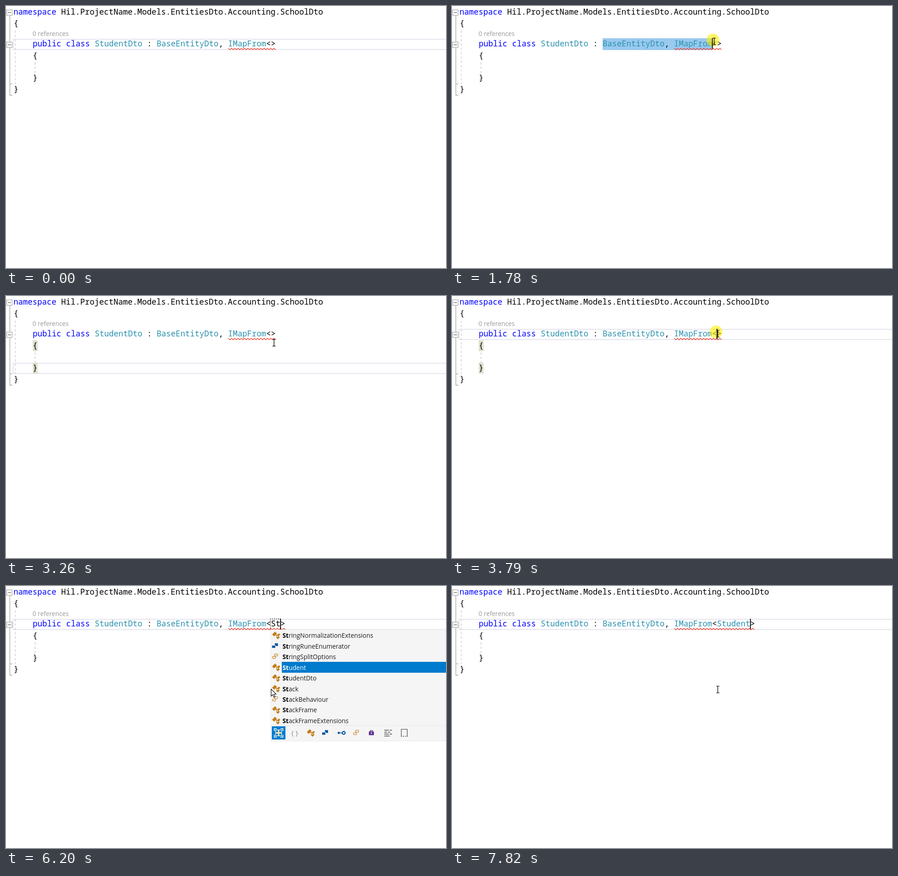
An HTML page with a canvas for the animation above (7.99 s loop, 970 px wide and 577 px high).

```html
<!DOCTYPE html>
<html lang="en">
<head>
<meta charset="utf-8">
<title>Code completion</title>
<style>
html, body { margin: 0; width: 100%; height: 100%; overflow: hidden; background: #fff; }
canvas { display: block; }
</style>
</head>
<body>
<canvas id="stage" width="970" height="577"></canvas>
<script>
const LOOP = 7990;
const CW = 10.5;              // width of one code character
const LEFT = 59;              // x of the class line
const TEAL = '#2b91af', BLUE = '#0000ff', GREY = '#a5a5a5';
const ORANGE = '#c27d1a', NAVY = '#00539c', PANEL = '#f5f5f5';
const MONO = '17.5px "Noto Sans Mono", monospace';
const UI = '13.85px "Open Sans", sans-serif';
const c = document.getElementById('stage').getContext('2d');

const WORD = 'Student';
const KEYS = [5670, 6120, 6430, 6810, 7060, 7290, 7440];   // key presses
const LISTS = [5820, 6200, 6510, 6890, 7120, 7360];        // list refreshes
const POPUP_END = 7590;

// cursor path: time, x, y
const PATH = [
  [150, 642, 459], [400, 420, 330], [620, 218, 190], [940, 326, 86],
  [1010, 326, 86], [1100, 327, 84], [1340, 327, 84], [1780, 578, 78],
  [1940, 597, 79], [2240, 597, 79], [2480, 602, 149], [2710, 602, 149],
  [3500, 586, 83], [3830, 586, 83], [4110, 586, 228]
];

// rows: icon kind and label
const ROWS_S = [
  ['class', 'SerializableAttribute'], ['struct', 'Single'], ['struct', 'Span'],
  ['class', 'StackOverflowException'], ['class', 'String'], ['class', 'StringComparer'],
  ['enum', 'StringComparison'], ['class', 'Student'], ['class', 'StudentDto']
];
const ROWS_ST = [
  ['class', 'StringNormalizationExtensions'], ['struct', 'StringRuneEnumerator'],
  ['enum', 'StringSplitOptions'], ['class', 'Student'], ['class', 'StudentDto'],
  ['class', 'Stack'], ['enum', 'StackBehaviour'], ['class', 'StackFrame'],
  ['class', 'StackFrameExtensions']
];
const ROWS_STU = [['class', 'Student'], ['class', 'StudentDto'], ['class', 'StudentMap']];

const col = n => LEFT + n * CW;
const within = (t, a, b) => t >= a && t < b;
const countPast = (times, t) => times.filter(k => t >= k).length;

function text(s, x, y, color, font = MONO) {
  c.font = font;
  c.fillStyle = color;
  c.fillText(s, x, y);
  return x + c.measureText(s).width;
}

function rect(x, y, w, h, color) {
  c.fillStyle = color;
  c.fillRect(x, y, w, h);
}

function line(points, color, width = 1, dash = []) {
  c.beginPath();
  points.forEach(([x, y]) => c.lineTo(x, y));
  c.setLineDash(dash);
  c.strokeStyle = color;
  c.lineWidth = width;
  c.stroke();
  c.setLineDash([]);
}

function dot(x, y, r, color) {
  c.beginPath();
  c.arc(x, y, r, 0, 7);
  c.fillStyle = color;
  c.fill();
}

function frame(x, y, w, h, color, width) {
  c.strokeStyle = color;
  c.lineWidth = width;
  c.strokeRect(x, y, w, h);
}

function cursorAt(t) {
  const i = PATH.findIndex(p => p[0] > t);
  if (i < 0) return PATH[PATH.length - 1].slice(1);
  const [t0, x0, y0] = PATH[i - 1], [t1, x1, y1] = PATH[i];
  const k = (t - t0) / (t1 - t0);
  return [x0 + (x1 - x0) * k, y0 + (y1 - y0) * k];
}

function fold(y) {
  rect(1, y - 6, 13, 13, '#fff');
  frame(1.5, y - 5.5, 12, 12, GREY, 1.2);
  line([[4, y + .5], [11, y + .5]], '#555', 1.2);
}

function outline() {
  line([[8.5, 21], [8.5, 196.5], [14, 196.5]], GREY, 1.3);
  line([[8, 171.5], [14, 171.5]], GREY, 1.3);
  fold(14);
  fold(85);
  line([[20.5, 54], [20.5, 172]], '#cacaca', 1.4, [5, 4.5]);
  line([[64, 124], [64, 148]], '#cacaca', 1.4, [5, 4.5]);
}

function lineBox(y) {
  frame(16, y, 970, 22.5, '#e8e8f2', 2.4);
}

function brace(x, y) {
  rect(x, y, CW, 24, '#dbe0cc');
}

function code(typed, resolved) {
  const x = text('namespace', 16.5, 19, BLUE);
  text(' Hil.ProjectName.Models.EntitiesDto.Accounting.SchoolDto', x, 19, '#000');
  text('{', 17, 43.5, '#000');
  text('0 references', 58.5, 66, '#999', UI);
  let at = LEFT;
  [['public class ', BLUE], ['StudentDto', TEAL], [' : ', '#000'], ['BaseEntityDto', TEAL],
   [', ', '#000'], ['IMapFrom', TEAL], ['<', '#000'],
   [typed, resolved ? TEAL : '#000'], ['>', '#000']
  ].forEach(([s, color]) => at = text(s, at, 89, color));
  text('{', LEFT, 114.5, '#000');
  text('}', LEFT, 164, '#000');
  text('}', 17, 188.5, '#000');

  const wave = [];
  for (let wx = 490, i = 0; wx <= at + 1; wx += 3.6, i++) wave.push([wx, i % 2 ? 96.5 : 93]);
  line(wave, '#ee4a3a', 1.4);
}

const ICONS = {
  class(x, y) {
    c.save();
    c.translate(x - 3.5, y - 3);
    c.rotate(-Math.PI / 4);
    rect(-4.5, -3, 9, 6, ORANGE);
    c.restore();
    line([[x - 2, y - 1], [x + 5, y - 1]], ORANGE, 1.4);
    line([[x + 1, y - 1], [x + 1, y + 5], [x + 4, y + 5]], ORANGE, 1.4);
    for (const [dx, dy] of [[5.5, -1], [4.5, 5]]) {
      c.save();
      c.translate(x + dx, y + dy);
      c.rotate(-Math.PI / 4);
      rect(-3, -2, 6, 4, ORANGE);
      c.restore();
    }
  },
  struct(x, y) {
    rect(x - 3, y - 6, 7, 6, NAVY);
    rect(x - 9, y - 2, 8, 7, PANEL);
    rect(x - 9, y - 1, 7, 5, NAVY);
  },
  enum(x, y) {
    for (const [dx, dy] of [[-3.5, -6], [-8, -.5]]) {
      c.beginPath();
      c.roundRect(x + dx, y + dy, 7, 4.5, 1.8);
      c.fillStyle = PANEL;
      c.fill();
      c.strokeStyle = ORANGE;
      c.lineWidth = 1.2;
      c.stroke();
    }
  }
};

function filterBar(y, bracesOn) {
  rect(586, y - 14.5, 30, 29, '#007acc');
  frame(594.5, y - 6.5, 13, 13, '#f3f3f3', 1.4);
  line([[594, y], [608, y]], '#f6e7b4', 3);
  line([[601, y - 7], [601, y + 7]], '#f6e7b4', 3);
  for (const sx of [-1, 1]) for (const sy of [-1, 1])
    line([[601 + sx * 4, y + sy * 9.5], [601 + sx * 9.5, y + sy * 9.5], [601 + sx * 9.5, y + sy * 4]], '#fff', 1.6);
  text('{ }', 628.5, y + 5, bracesOn ? '#424242' : '#b4b4b4', 'bold 15px "Open Sans", sans-serif');
  ICONS.class(672, y);
  ICONS.struct(706, y);
  line([[733, y], [742, y]], NAVY, 1.6);
  dot(733.5, y, 2.4, NAVY);
  dot(744.5, y, 4.2, NAVY);
  dot(744.5, y, 2, PANEL);
  ICONS.enum(774, y);
  frame(803, y - 5, 5, 4, '#5b2d90', 1.4);
  rect(800, y - 3, 11, 8, '#5b2d90');
  rect(804.5, y - 1, 2, 3, PANEL);
  [[834, 844], [846, 851], [834, 840], [842, 847], [834, 844], [846, 851], [834, 846]]
    .forEach(([a, b], i) => {
      const ly = y - 6 + Math.floor(i / 2) * 4.3;
      line([[a, ly], [b, ly]], '#424242', 1.5);
    });
  line([[871.5, y + 8], [871.5, y - 8], [884.5, y - 8], [884.5, y + 8]], '#424242', 1.2);
  line([[871, y + 7.5], [885, y + 7.5]], '#424242', 1.6, [2, 2]);
}

function popup(n) {
  const rows = n === 1 ? ROWS_S : n === 2 ? ROWS_ST : ROWS_STU.slice(0, n === 3 ? 3 : 2);
  const picked = n === 1 ? 4 : rows.findIndex(r => r[1] === WORD);
  const barTop = Math.min(307, 98 + 23.5 * rows.length);
  rect(583, 96, 387, barTop + 35 - 96, PANEL);
  line([[970, 96.5], [583.5, 96.5], [583.5, barTop + 34.5], [970, barTop + 34.5]], '#ececee');
  rows.forEach(([kind, label], i) => {
    const y = 109.3 + 23.45 * i;
    const on = i === picked;
    if (on) rect(608, Math.round(y - 12.4), 362, 24, '#007acc');
    ICONS[kind](595.5, y - .5);
    const x = text(label.slice(0, n), 609.5, y + 5, on ? '#fff' : '#000', 'bold ' + UI);
    text(label.slice(n), x, y + 5, on ? '#fff' : '#1e1e1e', UI);
  });
  line([[584, barTop], [970, barTop]], '#e6e6e8');
  filterBar(barTop + 16.5, n === 1);
  return barTop + 35;
}

function iBeam(x, y) {
  line([[x, y - 6.5], [x, y + 6.5]], '#000', 1.3);
  for (const s of [-1, 1]) {
    line([[x - 3.5, y + s * 7.5], [x - .8, y + s * 7.5], [x, y + s * 6.5],
          [x + .8, y + s * 7.5], [x + 3.5, y + s * 7.5]], '#000', 1.2);
  }
}

function arrow(x, y) {
  c.save();
  c.translate(x + .5, y);
  const shape = new Path2D('M0 0V15.5L3.6 12.2 6.2 18 8.8 16.8 6.2 11.2H11Z');
  c.fillStyle = '#fff';
  c.fill(shape);
  c.strokeStyle = '#000';
  c.lineWidth = 1.1;
  c.stroke(shape);
  c.restore();
}

function draw(t) {
  rect(0, 0, 970, 577, '#fff');
  const n = countPast(KEYS, t);
  const [mx, my] = t < PATH[0][0] ? [-50, -50] : cursorAt(t);

  let caret = null, selEnd = 26;
  if (within(t, 1340, 2480)) {
    selEnd = Math.max(26, Math.min(51, Math.round((mx - 4 - LEFT) / CW)));
    caret = [col(selEnd) + .5, 71];
  } else if (within(t, 2480, 3790)) {
    if (Math.floor((t - 2480) / 540) % 2 === 0) caret = [70, 147];
  } else if (t >= 3790) {
    const since = t - (n ? KEYS[n - 1] : 3790);
    if (Math.floor(since / 550) % 2 === 0) caret = [col(50 + n) + .3, 72];
  }

  if (within(t, 2480, 3790)) lineBox(148.2);
  else if (selEnd === 26) lineBox(73.4);

  if (within(t, 2020, 2710)) {
    brace(col(49), 72);
    brace(col(50), 72);
  }
  if (within(t, 2710, 3870)) {
    brace(LEFT, 97.5);
    brace(LEFT, 147);
  }
  if (selEnd > 26) rect(col(26), 71, (selEnd - 26) * CW, 26, '#99c9ef');

  outline();
  code(WORD.slice(0, n), t >= 7820);

  if (n && n < WORD.length) {
    line([[583, 96], [583, 72.5], [col(50 + n), 72.5], [col(50 + n), 96]], '#222', 1.4, [2, 2.5]);
  }
  let bottom = 0;
  if (within(t, LISTS[0], POPUP_END)) bottom = popup(countPast(LISTS, t));

  if (within(t, 1340, 2240)) dot(mx - 3, my - 3, 14, 'rgba(255,238,0,.6)');
  if (within(t, 2480, 2550)) dot(600, 149, 14, 'rgba(255,238,0,.6)');
  if (within(t, 3790, 3870)) dot(582, 79, 14, 'rgba(255,238,0,.6)');

  if (caret) line([[caret[0], caret[1]], [caret[0], caret[1] + 23.5]], '#000', 1.7);
  if (bottom && my < bottom) arrow(584, 227);
  else iBeam(mx, my);
}

function tick(now) {
  draw(now % LOOP);
  requestAnimationFrame(tick);
}
requestAnimationFrame(tick);
</script>
</body>
</html>
```
